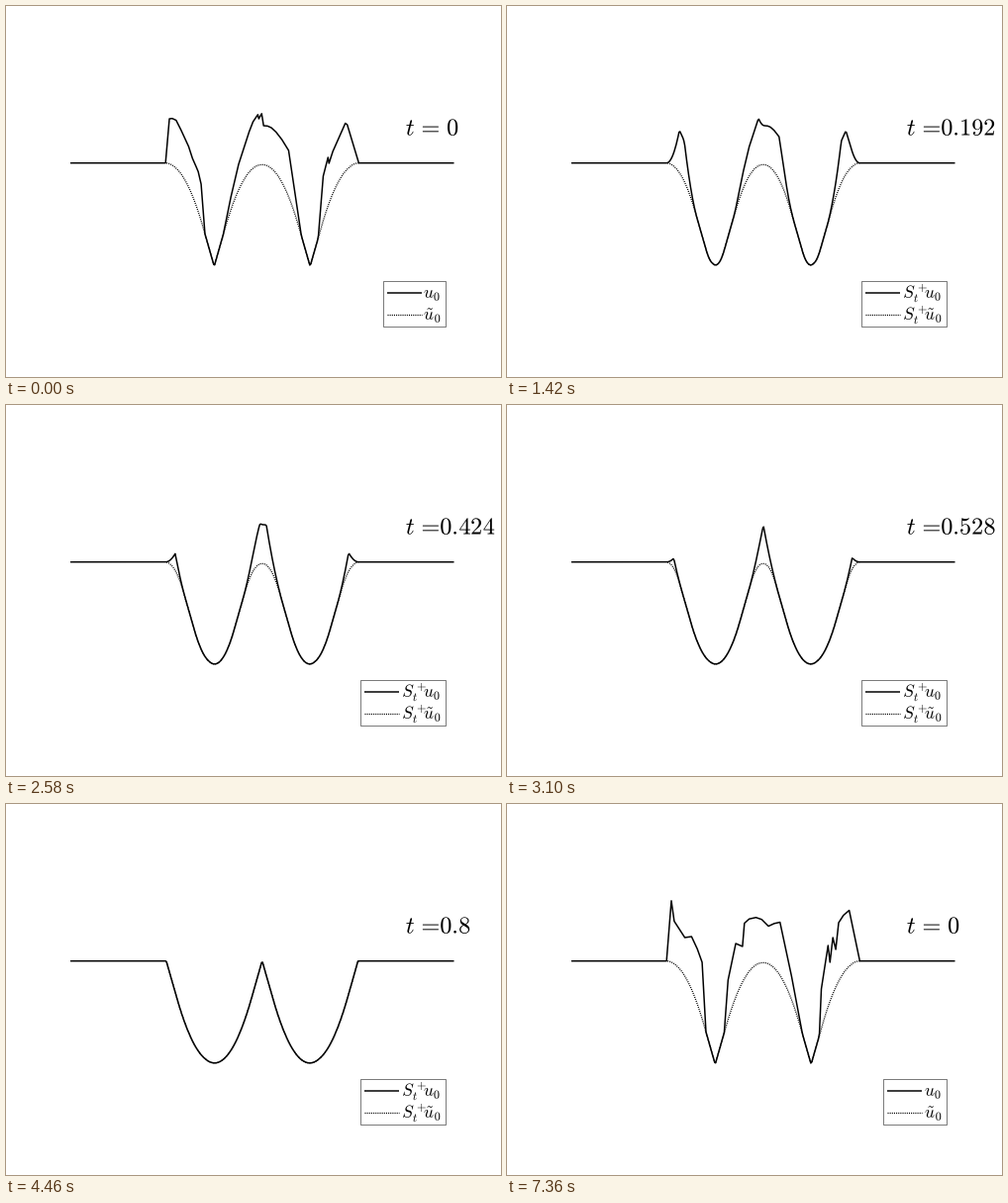
A matplotlib script for the animation above (8000 ms loop, 500 by 375 pixels).

```python
from functools import lru_cache

import numpy as np
import matplotlib.pyplot as plt
from matplotlib.animation import FuncAnimation
from matplotlib.lines import Line2D
from matplotlib.patches import PathPatch, Rectangle
from matplotlib.path import Path
from matplotlib.textpath import TextPath
from matplotlib.transforms import Affine2D

plt.rcParams["mathtext.fontset"] = "cm"

W, H = 500, 375
PX = 0.72                       # points per pixel at 100 dpi
STEP_MS, LOOP_MS = 20, 8000
START, HOLD, SLIDE = 500, 4460, 6460
T, DT = 0.8, 0.008

LEFT, SPAN, N = 65, 387.5, 400
ZERO = 158.7                    # pixel row of u = 0
CURVE, SLOPE = 0.047, 3.5       # cup curvature at time T, steepest slope
LABEL = 24.3                    # font size of the time label

x = np.linspace(LEFT, LEFT + SPAN, N)
unit = SPAN / 4
sq_dist = (x[:, None] - x[None, :]) ** 2


def cup(d):
    edge = SLOPE / (2 * CURVE)
    return np.where(d < edge, CURVE * d**2, CURVE * edge**2 + SLOPE * (d - edge))


def final_profile():
    pos = np.abs(x - LEFT - SPAN / 2) / unit
    u = cup(np.abs(pos - 0.5) * unit) - cup(unit / 2)
    return np.where(pos < 1, u, 0.0)


def forward(u, t):
    """Hopf-Lax evolution: inf-convolution with a parabola."""
    if t == 0:
        return u
    return np.min(u + CURVE * T / t * sq_dist, axis=1)


def backward(u):
    return np.max(u - CURVE * sq_dist, axis=1)


tilde = backward(final_profile())


def initial(*humps):
    """Raise humps, given as pixel points, above the reference profile."""
    u = tilde.copy()
    for hump in humps:
        px, py = np.array(hump).T
        k = np.round((px - LEFT) / SPAN * (N - 1)).astype(int)
        span = np.arange(k[0], k[-1] + 1)
        u[span] = np.maximum(u[span], np.interp(span, k, ZERO - py))
    return u


first = initial(
    [(161, 158.7), (164.8, 114), (168, 113.7), (172, 115.5), (176, 123),
     (184, 142), (188.2, 154), (191.5, 160.5), (194, 167.5),
     (197, 180), (201, 230.4)],
    [(219.6, 231), (227, 193), (235, 160), (246, 127), (250, 117),
     (254, 109.8), (255.3, 114), (258.4, 108.8), (260.2, 121), (264, 121.3),
     (268, 123), (273, 127.5), (279, 135), (285.7, 146), (298, 230.6)],
    [(316, 232), (320, 172), (325, 153), (326, 159),
     (330, 147), (343, 118.5), (344.3, 120), (356, 158.7)])

second = initial(
    [(161, 158.7), (166, 97.8), (168.5, 118.5), (172, 123),
     (179.5, 135), (186.5, 134), (192, 146.5), (197, 160), (201, 230.4)],
    [(219.6, 231), (223.5, 178), (231.4, 141), (237.4, 144), (240, 120.5),
     (245, 116.2), (251, 114.7), (257, 116.7), (264.5, 123.5), (270, 120.8),
     (275.6, 119.5), (287.5, 174), (298, 230.6)],
    [(316, 232), (317.5, 187), (324, 143), (326.5, 160), (329, 135),
     (332, 147), (335, 120), (340, 112.5), (345.5, 107.5), (356, 158.7)])

fig = plt.figure(figsize=(W / 100, H / 100), dpi=100, facecolor="white")
to_screen = Affine2D().scale(1, -1).translate(0, H)


@lru_cache(maxsize=None)
def glyphs(text, size):
    """Outline of a formula with its ink starting at x = 0."""
    path = TextPath((0, 0), f"${text}$", size=size)
    verts = path.vertices - [path.get_extents().x0, 0]
    return Path(verts * [1, -1], path.codes)


def put(text, left, base, size):
    path = glyphs(text, size)
    return Path(path.vertices + [left, base], path.codes)


def number(text, left, base):
    """Digits on the fixed advances of the font, so each is laid out once."""
    bearing = {"1": 0.087, ".": 0.078}
    parts = []
    for char in text:
        parts.append(put(char, left + bearing.get(char, 0.042) * LABEL, base, LABEL))
        left += (0.278 if char == "." else 0.5) * LABEL
    return parts


def add(artist):
    artist.set_transform(to_screen)
    fig.add_artist(artist)


def stroke(xs, ys, dotted=False):
    if dotted:
        style = dict(lw=1.3 * PX, ls=(0, (0.8, 0.85)), dash_capstyle="butt")
    else:
        style = dict(lw=1.5 * PX, solid_capstyle="butt", solid_joinstyle="round")
    add(Line2D(xs, ys, color="black", **style))


def scene(start, t, shift=0, box_left=380.5):
    running = t > 0
    stroke(x + shift, ZERO - forward(start, t))
    cups = slice(N // 4, 3 * N // 4 + 1)
    stroke(x[cups] + shift, ZERO - forward(tilde, t)[cups], dotted=True)

    text = [put("t", 404.4, 130.6, LABEL), put("=", 420.8, 130.6, LABEL)]
    text += number(f"{t:.3g}", 438.2 if running else 445, 130.6)

    left = 357.5 if running else box_left
    add(Rectangle((left + shift, 277.5), 443.5 - left, 46,
                  fc="white", ec="0.15", lw=0.6 * PX))
    for row, name, dotted in ((289.5, "u_0", False), (311.5, r"\tilde{u}_0", True)):
        stroke([left + 4 + shift, left + 39.5 + shift], [row, row], dotted)
        text.append(put(name, 422.5, row + 5.3, 17.3))
        if running:
            text.append(put("S_t^+", 401.2, row + 5.3, 17.3))
    ink = Path.make_compound_path(*text)
    add(PathPatch(Path(ink.vertices + [shift, 0], ink.codes), fc="black", lw=0))


def state_at(ms):
    """Number of evolution steps and of slide steps done."""
    if ms < START:
        return 0, 0
    steps = (min(ms, HOLD) - START) // 40 + 1
    slides = 0 if ms < SLIDE else min((ms - SLIDE) // 100 + 1, 10)
    return steps, slides


shown = None


def draw(frame):
    global shown
    state = state_at(frame * STEP_MS)
    if state != shown:
        shown = state
        for artist in list(fig.artists):
            artist.remove()
        steps, slides = state
        shift = round(W * (1 - (1 - slides / 10) ** 2))
        if shift < W:
            scene(first, steps * DT, shift)
        if shift > 0:
            scene(second, 0, shift - W, box_left=379.5)
    return fig.artists


anim = FuncAnimation(fig, draw, frames=LOOP_MS // STEP_MS, interval=STEP_MS,
                     init_func=lambda: [], repeat=True, repeat_delay=0)
plt.show()
```
